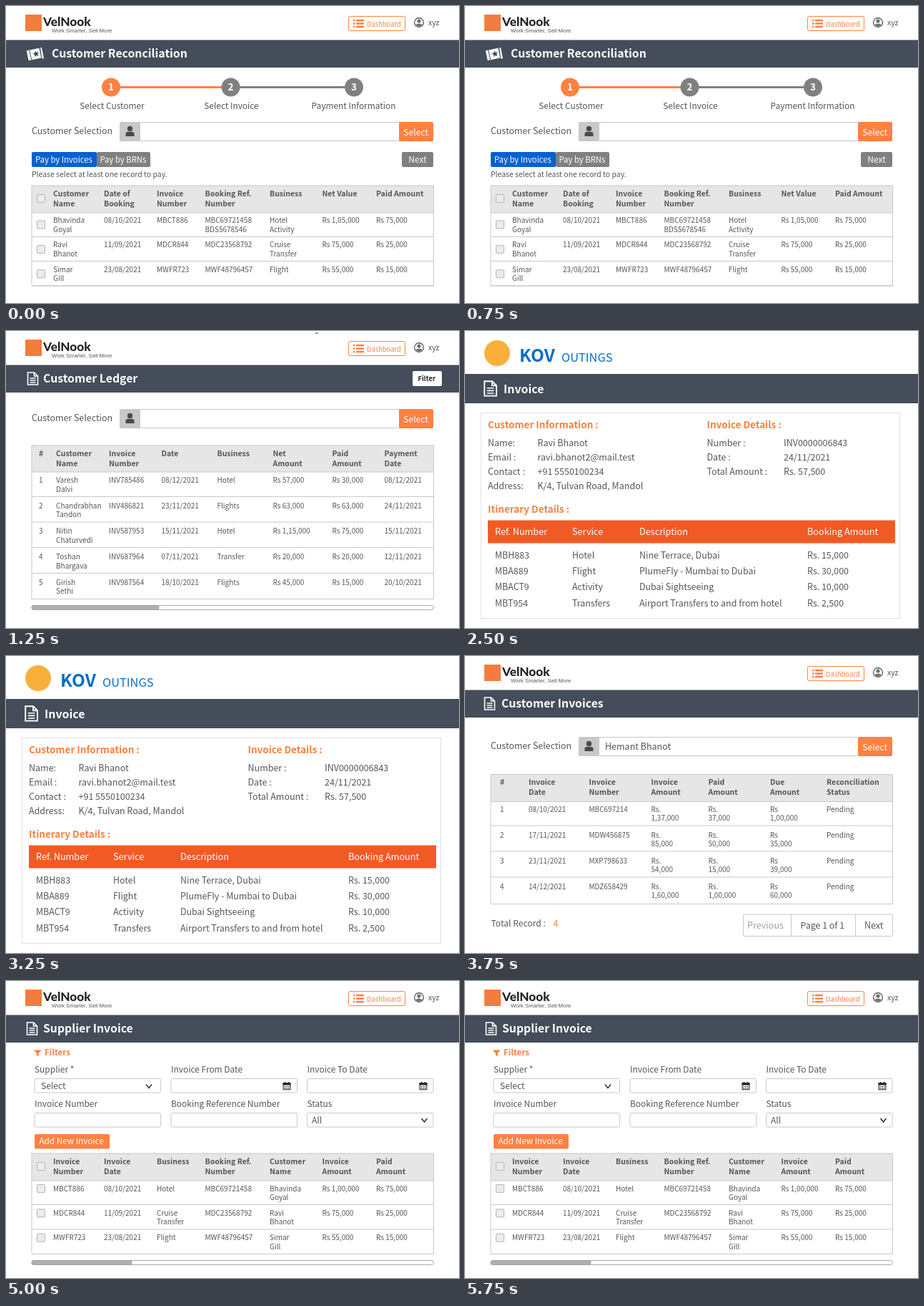
Recreate the animation shown at these times as an HTML page. Size 634 by 415 pixels, loop 6.25 s.

```html
<!DOCTYPE html>
<html lang="en">
<head>
<meta charset="utf-8">
<style>
html, body { margin: 0; width: 100%; height: 100%; overflow: hidden; background: #fff; }
svg { display: block; width: 634px; height: 415px; font-family: "Noto Sans CJK JP", "Noto Sans CJK SC", "Noto Sans", sans-serif; }
text { white-space: pre; }
</style>
</head>
<body>
<svg id="stage" viewBox="0 0 634 415"></svg>
<script>
const ORANGE = '#ff8142', INK = '#555', GREY = '#808080', LINE = '#c8c8c8', BAR = '#454d5b';
const SLIDE_MS = 1250;

// "|" in a string starts a new line
const text = (x, y, s, size = 12, fill = INK, weight = 400, gap = 12.5, extra = '') =>
  s.split('|').map((line, i) =>
    `<text x="${x}" y="${y + i * gap}" font-size="${size}" fill="${fill}" font-weight="${weight}" ${extra}>${line}</text>`).join('');
const middle = (x, y, s, size, fill, weight) => text(x, y, s, size, fill, weight, 0, 'text-anchor="middle"');
const rect = (x, y, w, h, fill, stroke = 'none', r = 0) =>
  `<rect x="${x}" y="${y}" width="${w}" height="${h}" rx="${r}" fill="${fill}" stroke="${stroke}"/>`;
const circle = (x, y, r, fill) => `<circle cx="${x}" cy="${y}" r="${r}" fill="${fill}"/>`;
const stroke = (d, color, width = 1, extra = '') =>
  `<path d="${d}" stroke="${color}" stroke-width="${width}" fill="none" ${extra}/>`;
const shape = (d, fill) => `<path d="${d}" fill="${fill}"/>`;
const at = (x, y, body, scale = 1) => `<g transform="translate(${x} ${y}) scale(${scale})">${body}</g>`;

const page = (x, y, scale) => at(x, y,
  stroke('M1 1H10L15 6V18H1ZM10 1V6H15', '#fff', 1.6) + stroke('M4 9H12M4 12H12M4 15H12', '#fff', 1.3), scale);

const tickets = at(41, 67,
  `<g transform="rotate(-12)">${rect(-11, -7, 18, 14, '#fff')}${stroke('M-7 -7V7', BAR)}
   ${shape('M1 -4.5L2.3 -1.5L5.5 -1.3L3 .8L3.9 4L1 2.2L-1.9 4L-1 .8L-3.5 -1.3L-.3 -1.5Z', BAR)}</g>` +
  shape('M7 -9L9 -8.5L12 6L9.5 7Z', '#fff'));

const topBar = rect(27, 12, 23, 23, '#f47c3c') +
  text(52, 28, 'VelNook', 17.3, '#222', 800, 0, 'font-family="Lato, sans-serif"') +
  text(64, 36.5, 'Work Smarter, Sell More', 7.75, '#555', 400, 0, 'font-family="Liberation Sans, sans-serif"') +
  rect(479.5, 14.5, 79, 20, '#fff', ORANGE, 2) +
  [20, 24.5, 29].map(y => rect(486, y - 1.2, 2.5, 2.5, ORANGE) + rect(490, y - 1.2, 11, 2.5, ORANGE)).join('') +
  text(505, 28.5, 'Dashboard', 9.4, ORANGE) +
  circle(578, 23, 7.2, '#707070') + circle(578, 23, 5.6, '#fff') + circle(578, 21, 2.6, '#707070') +
  shape('M573.3 26.3Q578 22.8 582.7 26.3Q578 31 573.3 26.3Z', '#707070') +
  text(591, 27, 'xyz', 10.5);

const titled = (title, x, icon) =>
  topBar + rect(0, 47.5, 634, 38.5, BAR) + icon + text(x, 72, title, 15.8, '#fff', 600);

const selector = (y, value = '') =>
  text(36, y + 17, 'Customer Selection', 12.45) +
  rect(159.5, y + .5, 438, 26, '#fff', LINE, 2) + rect(159, y, 29, 27, '#c8c8c8', 'none', 2) +
  circle(173.5, y + 9.5, 3.7, '#4a4a4a') +
  shape(`M167.5 ${y + 20}V${y + 17}Q167.5 ${y + 13} 173.5 ${y + 14}Q179.5 ${y + 13} 179.5 ${y + 17}V${y + 20}Z`, '#4a4a4a') +
  rect(550, y, 48, 27, ORANGE, 'none', 2) + middle(573.7, y + 18.5, 'Select', 12.2, '#fff') +
  text(196, y + 17.5, value, 12.5);

const checkbox = y => rect(43.5, y + .5, 11, 11, '#ececec', '#b4b4b4', 1);

// lines: header top, header bottom, then the bottom of each row
function table(xs, lines, heads, rows, base, step, boxShift) {
  const [top, under] = lines, end = lines[lines.length - 1];
  let out = rect(36, top, 562.5, under - top, '#e6e6e6') + rect(36, top, 562.5, end - top, 'none', LINE);
  out += lines.slice(1).map(y => stroke(`M36 ${y}H598.5`, LINE)).join('');
  out += heads.map((h, i) => text(xs[i], top + 14.7, h, 10.5, INK, 600, 14)).join('');
  rows.forEach((row, r) => {
    const y = base + r * step;
    out += row.map((cell, i) => text(xs[i], y, cell, 10)).join('');
    if (boxShift) out += checkbox(y - 9 + boxShift);
  });
  return out + (boxShift ? checkbox(top + 12) : '');
}

const scrollbar = (y, end) => rect(36, y, 562.5, 6, '#fff', '#a8a8a8', 3) + rect(36, y, end - 36, 6, '#b0b0b0', '#a0a0a0', 3);

function reconciliation() {
  const steps = [[147, 148.5, 'Select Customer'], [314.5, 315.5, 'Select Invoice'], [487, 486.5, 'Payment Information']];
  return titled('Customer Reconciliation', 64, tickets) +
    stroke('M147 113.5H314', ORANGE, 3) + stroke('M314 113.5H487', GREY, 3) +
    steps.map(([x, labelX, label], i) => circle(x, 113.5, 13, i ? GREY : ORANGE) +
      middle(x, 118.3, `${i + 1}`, 13.5, '#fff', 600) + middle(labelX, 144, label, 11.9)).join('') +
    selector(162) +
    rect(36, 204, 91, 21, '#0661cf', 'none', 2) + rect(127, 204, 75, 21, GREY, 'none', 2) +
    text(41, 218.5, 'Pay by Invoices', 11.3, '#fff') + text(131.5, 218.5, 'Pay by BRNs', 11.3, '#fff') +
    rect(554, 204, 44, 21, GREY, 'none', 2) + middle(576, 218.5, 'Next', 12, '#fff') +
    text(36, 239, 'Please select at least one record to pay.', 10.45) +
    table([66, 137, 211, 278.5, 369, 442.5, 518], [251, 289, 322.5, 356.5, 391],
      ['Customer|Name', 'Date of|Booking', 'Invoice|Number', 'Booking Ref.|Number', 'Business', 'Net Value', 'Paid Amount'],
      [['Bhavinda|Goyal', '08/10/2021', 'MBCT886', 'MBC69721458|BDS5678546', 'Hotel|Activity', 'Rs 1,05,000', 'Rs 75,000'],
       ['Ravi|Bhanot', '11/09/2021', 'MDCR844', 'MDC23568792', 'Cruise|Transfer', 'Rs 75,000', 'Rs 25,000'],
       ['Simar|Gill', '23/08/2021', 'MWFR723', 'MWF48796457', 'Flight', 'Rs 55,000', 'Rs 15,000']],
      303, 34.4, 5.5);
}

function ledger() {
  return titled('Customer Ledger', 52, page(29.5, 57)) + rect(433, 2, 4, 2, '#999') +
    rect(569, 56, 41, 21, '#fff', 'none', 2) + middle(588.7, 70, 'Filter', 9.4, '#222', 600) +
    selector(109) +
    table([46, 70, 144, 217.5, 295.5, 373.5, 456.5, 529.5], [160, 197, 231.5, 267, 302.5, 338.5, 374.5],
      ['#', 'Customer|Name', 'Invoice|Number', 'Date', 'Business', 'Net|Amount', 'Paid|Amount', 'Payment|Date'],
      [['1', 'Varesh|Dalvi', 'INV785486', '08/12/2021', 'Hotel', 'Rs 57,000', 'Rs 30,000', '08/12/2021'],
       ['2', 'Chandrabhan|Tandon', 'INV486821', '23/11/2021', 'Flights', 'Rs 63,000', 'Rs 63,000', '24/11/2021'],
       ['3', 'Nitin|Chaturvedi', 'INV587953', '15/11/2021', 'Hotel', 'Rs 1,15,000', 'Rs 75,000', '15/11/2021'],
       ['4', 'Toshan|Bhargava', 'INV687964', '07/11/2021', 'Transfer', 'Rs 20,000', 'Rs 20,000', '12/11/2021'],
       ['5', 'Girish|Sethi', 'INV987564', '18/10/2021', 'Flights', 'Rs 45,000', 'Rs 15,000', '20/10/2021']],
      212, 35.7) +
    scrollbar(383.5, 214);
}

function invoice() {
  const pairs = (x, valueX, list) => list.map(([label, value], i) =>
    text(x, 160.7 + i * 20, label, 12.5) + text(valueX, 160.7 + i * 20, value, 12.5)).join('');
  const cols = [42, 150, 244, 479];
  const row = (cells, y, size, fill) => cells.map((c, i) => text(cols[i], y, c, size, fill)).join('');
  const head = (x, y, s) => text(x, y, s, 13.5, '#f9803f', 600);
  return circle(45, 31, 18, '#f9b03a') +
    text(76, 42.5, 'KOV', 24.5, '#0b6fc2', 900) + text(135, 42.5, 'OUTINGS', 16.4, '#0b6fc2', 500) +
    rect(0, 60, 634, 41, BAR) + page(26, 69, 1.2) + text(54, 86.5, 'Invoice', 15.9, '#fff', 600) +
    rect(22.5, 114.5, 586, 287, '#fff', '#e0e0e0') +
    head(32, 135.7, 'Customer Information :') + head(338.5, 135.7, 'Invoice Details :') +
    pairs(32, 101.5, [['Name:', 'Ravi Bhanot'], ['Email :', 'ravi.bhanot2@mail.test'],
      ['Contact :', '+91 5550100234'], ['Address:', 'K/4, Tulvan Road, Mandol']]) +
    pairs(338.5, 446, [['Number :', 'INV0000006843'], ['Date :', '24/11/2021'], ['Total Amount :', 'Rs. 57,500']]) +
    head(32, 253.7, 'Itinerary Details :') + rect(32, 264.5, 570, 32, '#f25a25') +
    row(['Ref. Number', 'Service', 'Description', 'Booking Amount'], 285, 12.7, '#fff') +
    [['MBH883', 'Hotel', 'Nine Terrace, Dubai', 'Rs. 15,000'],
     ['MBA889', 'Flight', 'PlumeFly - Mumbai to Dubai', 'Rs. 30,000'],
     ['MBACT9', 'Activity', 'Dubai Sightseeing', 'Rs. 10,000'],
     ['MBT954', 'Transfers', 'Airport Transfers to and from hotel', 'Rs. 2,500']]
      .map((cells, i) => row(cells, 317.7 + i * 22.3, 12.45)).join('');
}

function invoices() {
  return titled('Customer Invoices', 51, page(26.5, 57)) + selector(113, 'Hemant Bhanot') +
    table([49, 89, 173.5, 260.5, 340.5, 427, 506], [165.5, 203.5, 237, 273, 309, 346.5],
      ['#', 'Invoice|Date', 'Invoice|Number', 'Invoice|Amount', 'Paid|Amount', 'Due|Amount', 'Reconciliation|Status'],
      [['1', '08/10/2021', 'MBC697214', 'Rs.|1,37,000', 'Rs.|37,000', 'Rs|1,00,000', 'Pending'],
       ['2', '17/11/2021', 'MDW456875', 'Rs.|85,000', 'Rs.|50,000', 'Rs|35,000', 'Pending'],
       ['3', '23/11/2021', 'MXP798633', 'Rs.|54,000', 'Rs.|15,000', 'Rs|39,000', 'Pending'],
       ['4', '14/12/2021', 'MDZ658429', 'Rs.|1,60,000', 'Rs.|1,00,000', 'Rs|60,000', 'Pending']],
      217.5, 36) +
    text(36.5, 378, 'Total Record :', 12.1) + text(123.5, 378, '4', 12.5, ORANGE) +
    rect(389.5, 361, 209, 30.5, '#fff', LINE, 2) + stroke('M456.5 361V391.5M546.5 361V391.5', LINE) +
    text(395, 380.5, 'Previous', 12.6, '#a0a0a0') + text(469.5, 380.5, 'Page 1 of 1', 12.4) + text(559, 380.5, 'Next', 12.5);
}

function supplier() {
  const xs = [40, 231, 421.5];
  const fields = (labels, y) => labels.map((s, i) =>
    text(xs[i], y, s, 11.95) + rect(xs[i], y + 8.5, 176.5, 19.5, '#fff', LINE, 2)).join('');
  const chevron = (x, y) => stroke(`M${x - 4} ${y - 2.5}L${x} ${y + 2.5}L${x + 4} ${y - 2.5}`, '#333', 1.5);
  const calendar = x => at(x, 141, rect(.6, 1.8, 9.8, 9, '#fff', '#222') + rect(0, 1.5, 11, 3, '#222') +
    stroke('M3 0V3M8 0V3', '#222', 1.5) + stroke('M2 6.5H9M2 8.8H9', '#222', 1.2, 'stroke-dasharray="1.7 .9"'));
  return titled('Supplier Invoice', 52, page(28.5, 57)) +
    shape('M39 96.5H49.5L45.7 101V105.5L42.8 103.5V101Z', ORANGE) +
    text(54, 104.3, 'Filters', 11.6, ORANGE, 600) +
    fields(['Supplier *', 'Invoice From Date', 'Invoice To Date'], 128) +
    fields(['Invoice Number', 'Booking Reference Number', 'Status'], 176) +
    text(49, 150.5, 'Select', 12.1) + text(428, 198.5, 'All', 12.1) +
    chevron(200, 147) + chevron(585.5, 194.5) + calendar(387.5) + calendar(578.5) +
    rect(40, 214, 105, 20.5, ORANGE, 'none', 2) + text(46.5, 228.3, 'Add New Invoice', 11.7, '#fff') +
    table([66, 137, 211, 278.5, 369, 442.5, 518], [241, 279, 312.5, 347, 381.5],
      ['Invoice|Number', 'Invoice|Date', 'Business', 'Booking Ref.|Number', 'Customer|Name', 'Invoice|Amount', 'Paid|Amount'],
      [['MBCT886', '08/10/2021', 'Hotel', 'MBC69721458', 'Bhavinda|Goyal', 'Rs 1,00,000', 'Rs 75,000'],
       ['MDCR844', '11/09/2021', 'Cruise|Transfer', 'MDC23568792', 'Ravi|Bhanot', 'Rs 75,000', 'Rs 25,000'],
       ['MWFR723', '23/08/2021', 'Flight', 'MWF48796457', 'Simar|Gill', 'Rs 55,000', 'Rs 15,000']],
      293.5, 34.4, -.5) +
    scrollbar(390.5, 176);
}

const stage = document.getElementById('stage');
stage.innerHTML = [reconciliation, ledger, invoice, invoices, supplier].map(draw => `<g>${draw()}</g>`).join('');
const slides = [...stage.children];

function show(now) {
  const current = Math.floor(now / SLIDE_MS) % slides.length;
  slides.forEach((slide, i) => slide.style.display = i === current ? '' : 'none');
  requestAnimationFrame(show);
}
show(0);
</script>
</body>
</html>
```
